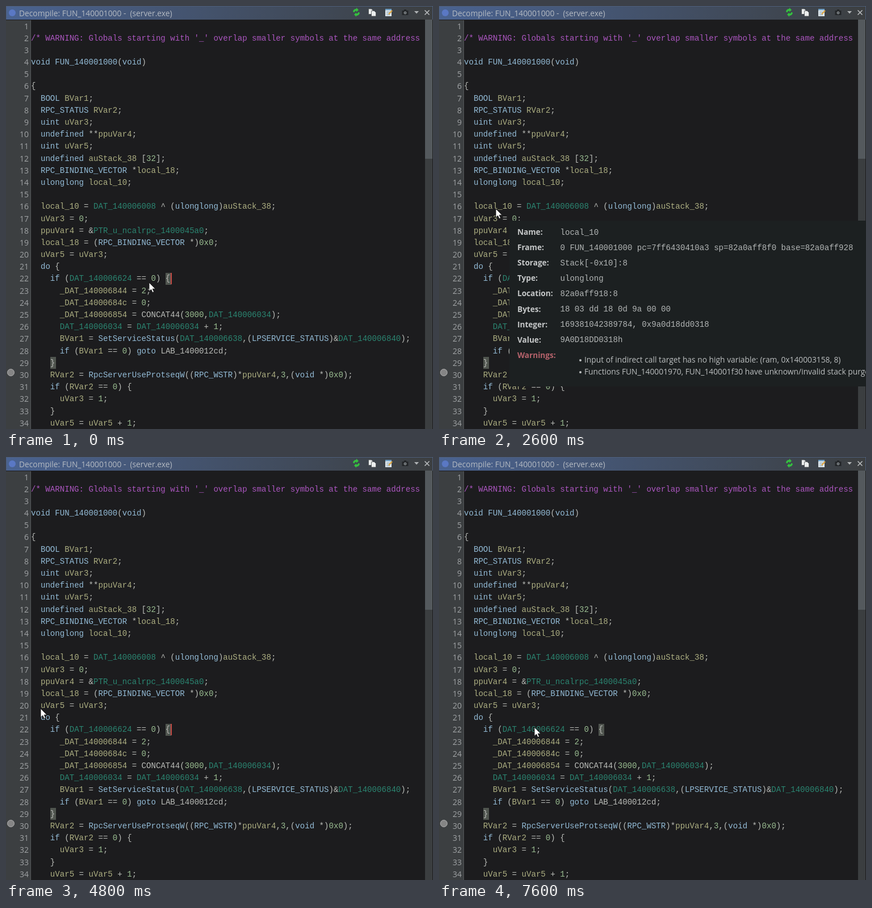
An HTML page that plays this animation: 752x745 px, repeating every 7.8 s.

```html
<!DOCTYPE html>
<html lang="en">
<head>
<meta charset="utf-8">
<title>Decompile</title>
<style>
  html, body { margin: 0; width: 100%; height: 100%; overflow: hidden; background: #1c1c1e; }
  #stage { position: relative; width: 752px; height: 745px; overflow: hidden; background: #1c1c1e; }
  #stage > * { position: absolute; }
  .sans, .label, #gutter { font-family: "Open Sans", "Noto Sans", sans-serif; white-space: pre; }
  #code, .value { font: 14.1px "Liberation Mono", "Courier New", monospace; white-space: pre; }

  #bar { left: 0; top: 0; width: 752px; height: 24px; box-sizing: border-box;
    border: solid #4d5d78; border-width: 1px 1px 0;
    background: linear-gradient(90deg, #4a6391, #3c3f41); }
  #title { left: 23px; top: 2px; font-size: 13.77px; line-height: 21px; color: #b4bac2; }
  #icons { left: 0; top: 0; }

  #gutter { left: 0; top: 24.5px; width: 40px; height: 721px; padding-right: 3px;
    background: #3c3f41; border-right: 1px solid #55585a;
    font-size: 14px; line-height: 21.18px; text-align: right; color: #a0a3a5; }
  #code { left: 44px; top: 25.5px; line-height: 21.18px; color: #b9bbb7; }
  .comment { color: #ac56c0; }
  .type { color: #93bbd6; }
  .global { color: #2b8571; }
  .var { color: #adaf82; }
  .num { color: #9abd91; }

  .match { width: 10px; height: 21px; background: #50554f; }
  #caret { left: 290px; top: 470px; width: 2px; height: 20px; background: #c44a44;
    animation: blink 7.8s step-end infinite; }
  #track { left: 738px; top: 24px; width: 13px; height: 721px; background: #3b3e40; }
  #thumb { left: 738px; top: 24px; width: 13px; height: 245px; background: #54595d; }
  #dot { left: 2px; top: 639px; width: 11px; height: 11px; border: 1px solid #b0b0b0;
    border-radius: 50%; background: #858585; }

  #tip { left: 124px; top: 378px; width: 628px; height: 292px; background: #1c2021;
    overflow: hidden; animation: hover 7.8s step-end infinite; }
  #tip > * { position: absolute; white-space: pre; line-height: 20px; }
  .label { left: 14px; font-weight: 700; font-size: 13.6px; color: #c6c8c9; }
  .label.warn { color: #b5626b; }
  .value { left: 89.5px; color: #b2b5b5; }
  .item { left: 132px; font-size: 13.8px; color: #bcbfc0; }
  .item::before { content: ""; position: absolute; left: -9px; top: 9px;
    width: 4px; height: 4px; border-radius: 50%; background: currentColor; }

  #cursor { left: 0; top: -1px; animation: roam 7.8s infinite; }

  @keyframes blink {
    0%, 10.256%, 23.076%, 35.897%, 48.717%, 61.538%, 74.358%, 87.179% { opacity: 1; }
    2.564%, 15.384%, 28.205%, 41.025%, 53.846%, 66.666%, 79.487%, 92.307%, 100% { opacity: 0; }
  }
  @keyframes hover {
    0%, 53.846%, 100% { visibility: hidden; }
    30.769% { visibility: visible; }
  }
  @keyframes roam {
    0% { transform: translate(252px, 488px); animation-timing-function: steps(4); }
    10.256% { transform: translate(101px, 365px); animation-timing-function: steps(2); }
    15.384% { transform: translate(103px, 357px); }
    28.205% { transform: translate(103px, 357px); animation-timing-function: steps(1); }
    30.769% { transform: translate(100px, 358px); }
    51.282% { transform: translate(100px, 358px); animation-timing-function: steps(4); }
    61.538% { transform: translate(61px, 444px); animation-timing-function: steps(4); }
    71.794%, 100% { transform: translate(168px, 477px); }
  }
</style>
</head>
<body>
<div id="stage">
  <div id="bar"></div>
  <div id="title" class="sans">Decompile: FUN_140001000 -  (server.exe)</div>
  <svg id="icons" width="752" height="24">
    <circle cx="11" cy="12" r="6" fill="#5a78c4"/>
    <g fill="#35c13f">
      <path d="M611 10q1-5 6-5v-2l4 4-4 3.500v-2q-3 0-3.500 3z"/>
      <path d="M623 12q-1 5-6 5v2l-4-4 4-3.500v2q3 0 3.500-3z"/>
    </g>
    <g fill="#eceeee" stroke="#4a4d50" stroke-width=".8">
      <path d="M638.500 5h5l2.500 2.500v7h-7.500z"/>
      <path d="M643.500 8.500h5l3 3v6.500h-8z"/>
    </g>
    <path d="M668 5h11v13h-11z" fill="#dfe7ec"/>
    <path d="M668 5h11v2.500h-11z" fill="#6f9fc4"/>
    <path d="M670 10.500h6M670 13h5M670 15.500h6" stroke="#8ba3b3"/>
    <path d="M674 14.500l6-6.500" stroke="#d9a441" stroke-width="2.400"/>
    <path d="M697.500 8h3l1-2h3l1 2h3v8h-11z" fill="#24272a"/>
    <circle cx="703" cy="12" r="2" fill="#50565b" stroke="#989c9e"/>
    <path d="M719 9h8l-4 4.500z" fill="#b0b3b5"/>
    <path d="M737.500 7.500l8 8M745.500 7.500l-8 8" stroke="#b9bcbe" stroke-width="1.600"/>
  </svg>
  <div id="gutter"></div>
  <div class="match" style="left:281px;top:469.500px"></div>
  <div class="match" style="left:77.500px;top:617.500px"></div>
  <div id="code"></div>
  <div id="caret"></div>
  <div id="track"></div>
  <div id="thumb"></div>
  <div id="dot"></div>
  <div id="tip"></div>
  <svg id="cursor" width="14" height="20" overflow="visible">
    <path d="M0 0V15.500L3.600 12.200L6 17.600L8.600 16.400L6.200 11.200H11Z" fill="#fff" stroke="#111" stroke-width=".9"/>
  </svg>
</div>
<script>
const source = `
/* WARNING: Globals starting with '_' overlap smaller symbols at the same address

void FUN_140001000(void)

{
  BOOL BVar1;
  RPC_STATUS RVar2;
  uint uVar3;
  undefined **ppuVar4;
  uint uVar5;
  undefined auStack_38 [32];
  RPC_BINDING_VECTOR *local_18;
  ulonglong local_10;

  local_10 = DAT_140006008 ^ (ulonglong)auStack_38;
  uVar3 = 0;
  ppuVar4 = &PTR_u_ncalrpc_1400045a0;
  local_18 = (RPC_BINDING_VECTOR *)0x0;
  uVar5 = uVar3;
  do {
    if (DAT_140006624 == 0) {
      _DAT_140006844 = 2;
      _DAT_14000684c = 0;
      _DAT_140006854 = CONCAT44(3000,DAT_140006034);
      DAT_140006034 = DAT_140006034 + 1;
      BVar1 = SetServiceStatus(DAT_140006638,(LPSERVICE_STATUS)&DAT_140006840);
      if (BVar1 == 0) goto LAB_1400012cd;
    }
    RVar2 = RpcServerUseProtseqW((RPC_WSTR)*ppuVar4,3,(void *)0x0);
    if (RVar2 == 0) {
      uVar3 = 1;
    }
    uVar5 = uVar5 + 1;`;

const rules = [
  ["comment", /^\/\*/],
  ["global", /^(DAT|PTR)_/],
  ["var", /^(_DAT_|local_|auStack)|Var\d$/],
  ["num", /^\d/],
  ["type", /^(BOOL|void|uint|undefined|ulonglong|RPC_\w+|LPSERVICE_STATUS|do|if|goto|FUN_\w+|SetServiceStatus|RpcServerUseProtseqW)$/],
];

function add(parent, cls, text, top) {
  const el = document.createElement(top === undefined ? "span" : "div");
  el.className = cls;
  el.textContent = text;
  if (top !== undefined) el.style.top = top + "px";
  parent.append(el);
}

const byId = id => document.getElementById(id);

for (const token of source.match(/\/\*.*|\w+|[^\w/]+/g)) {
  const rule = rules.find(([, pattern]) => pattern.test(token));
  add(byId("code"), rule ? rule[0] : "", token);
}
byId("gutter").textContent = source.split("\n").map((_, i) => i + 1).join("\n");

const fields = [
  ["Name", "local_10"],
  ["Frame", "0 FUN_140001000 pc=7ff6430410a3 sp=82a0aff8f0 base=82a0aff928"],
  ["Storage", "Stack[-0x10]:8"],
  ["Type", "ulonglong"],
  ["Location", "82a0aff918:8"],
  ["Bytes", "18 03 dd 18 0d 9a 00 00"],
  ["Integer", "169381042389784, 0x9a0d18dd0318"],
  ["Value", "9A0D18DD0318h"],
  ["Warnings", ""],
];
const tip = byId("tip");
fields.forEach(([name, value], i) => {
  const top = 10 + i * 27.1;
  add(tip, value ? "label" : "label warn", name + ":", top);
  add(tip, "value", value, top + 0.5);
});
add(tip, "sans item", "Input of indirect call target has no high variable: (ram, 0x140003158, 8)", 235);
add(tip, "sans item", "Functions FUN_140001970, FUN_140001f30 have unknown/invalid stack purge", 256);
</script>
</body>
</html>
```
